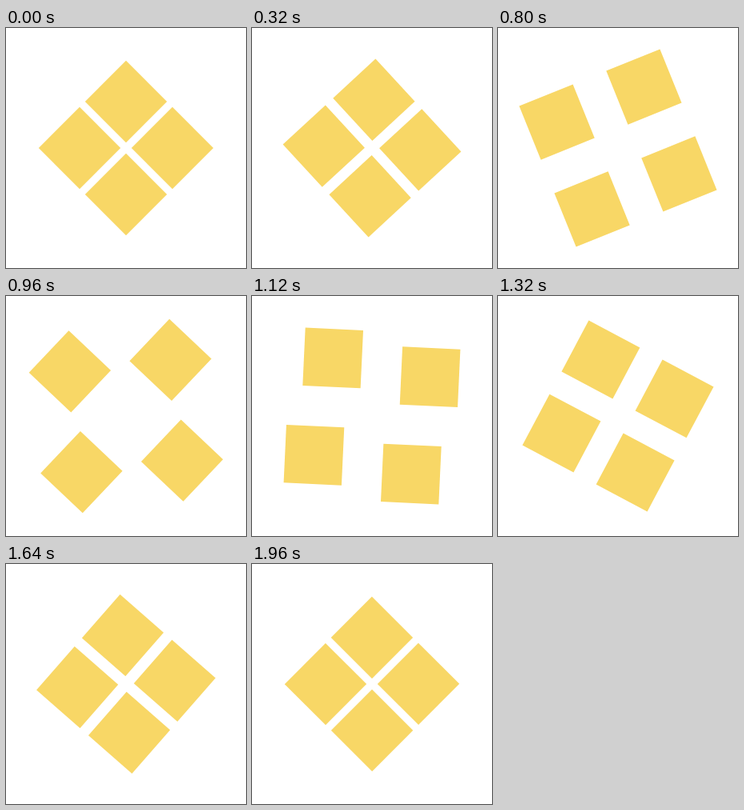
Write an HTML page that moves like this. It is 300 by 300 pixels and loops after 2 s.

```html
<!DOCTYPE html>
<html lang="en">
<head>
<meta charset="utf-8">
<title>Four squares loader</title>
<style>
  html, body { margin: 0; width: 100%; height: 100%; overflow: hidden; background: #fff; }
  svg { display: block; width: 100vw; height: 100vh; }
</style>
</head>
<body>
<svg viewBox="0 0 300 300">
  <g id="group" fill="#f8d766"></g>
</svg>
<script>
const LOOP = 2000;
const SIDE = 72.4;
const NEAR = 58;       // distance of each square from the centre when closed
const SPREAD = 31.7;   // extra distance when fully open
const SPIN_LAG = 20;

const group = document.getElementById('group');
const squares = [0, 90, 180, 270].map(angle => {
  const rect = document.createElementNS('http://www.w3.org/2000/svg', 'rect');
  for (const [name, value] of Object.entries({ x: -SIDE / 2, y: -SIDE / 2, width: SIDE, height: SIDE }))
    rect.setAttribute(name, value);
  group.append(rect);
  return { rect, angle };
});

const clamp = v => Math.min(1, Math.max(0, v));

// Eased curve with horizontal ends: cubic-bezier(x1, 0, x2, 1)
function bezier(x1, x2) {
  return x => {
    let low = 0, high = 1;
    for (let i = 0; i < 24; i++) {
      const s = (low + high) / 2, r = 1 - s;
      if (3 * x1 * s * r * r + 3 * x2 * s * s * r + s ** 3 < x) low = s;
      else high = s;
    }
    return low * low * (3 - 2 * low);
  };
}

const turn = bezier(0.6, 0.4);
const open = bezier(0.78, 0.7);

function draw(time) {
  const t = time % LOOP;
  const spin = 90 * turn(clamp((t - SPIN_LAG) / LOOP));
  const distance = NEAR + SPREAD * open(1 - Math.abs(t / 1000 - 1));
  const flip = 180 * turn(clamp((t - 800) / 400));

  group.setAttribute('transform', `translate(150 150) rotate(${spin})`);
  for (const { rect, angle } of squares)
    rect.setAttribute('transform', `rotate(${angle}) translate(0 ${-distance}) rotate(${45 + flip})`);
}

const start = performance.now();
function tick() {
  draw(performance.now() - start);
  requestAnimationFrame(tick);
}
tick();
</script>
</body>
</html>
```
